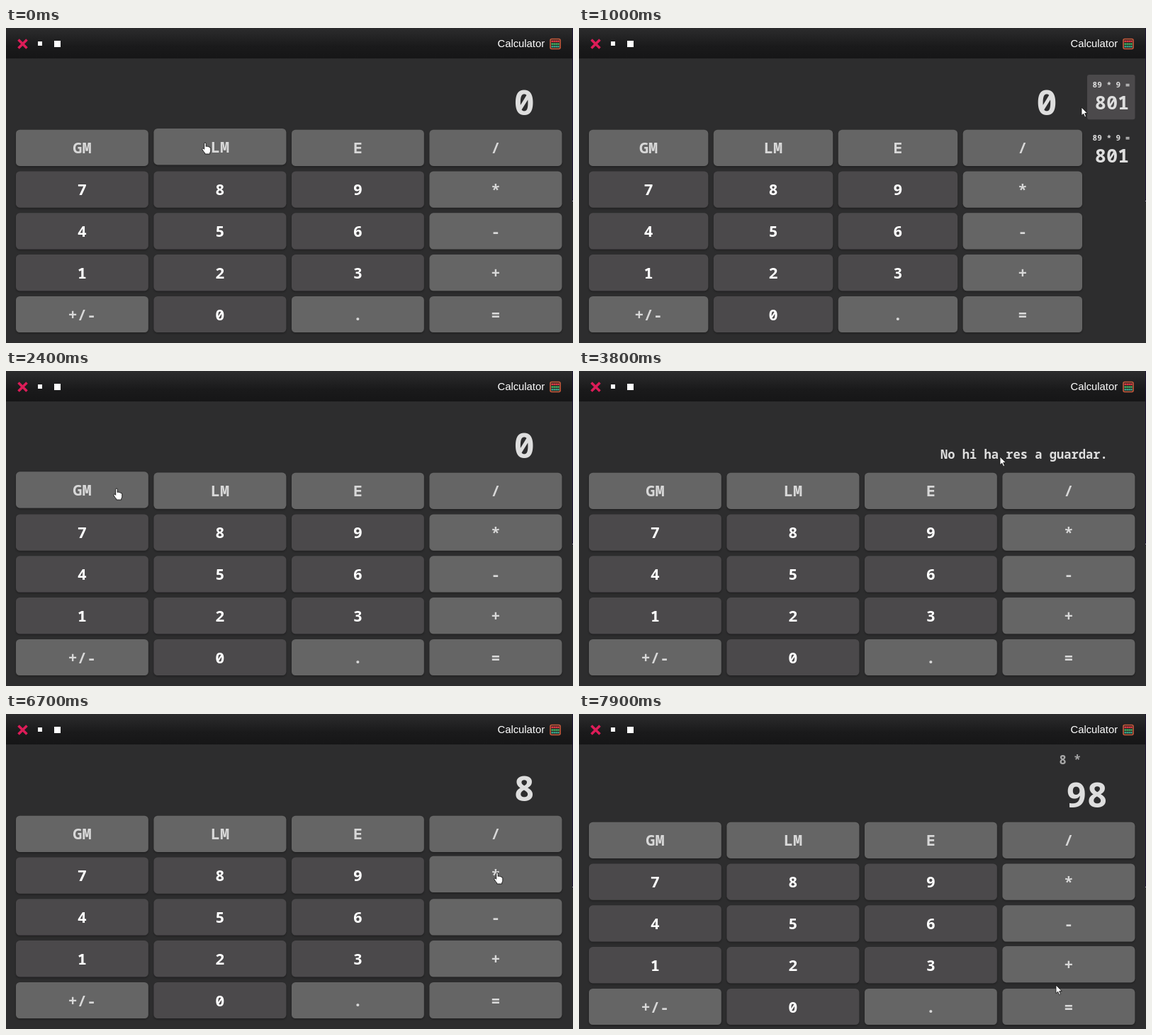
An HTML page for the animation above (8000 ms loop, 800x445 px).

```html
<!DOCTYPE html>
<html lang="ca">
<head>
<meta charset="utf-8">
<title>Calculator</title>
<style>
  html, body { margin: 0; width: 100%; height: 100%; overflow: hidden; background: #2d2d2e; }
  svg { display: block; width: 100vw; height: 100vh; }
  text { font-family: "Noto Sans Mono", "DejaVu Sans Mono", monospace; font-weight: 700; fill: #dedede; white-space: pre; }
  .mid { text-anchor: middle; }
  .end { text-anchor: end; }
  .key text { font-size: 22px; }
  .title { font: 14.8px "Liberation Sans", Arial, sans-serif; fill: #fff; }
</style>
</head>
<body>
<svg id="stage" viewBox="0 0 800 445" preserveAspectRatio="none">
  <defs>
    <linearGradient id="bar" x2="0" y2="1">
      <stop offset="0" stop-color="#2c2c2d"/>
      <stop offset=".6" stop-color="#1a1a1b"/>
      <stop offset="1" stop-color="#161617"/>
    </linearGradient>
    <filter id="shade" x="-5%" y="-15%" width="110%" height="140%">
      <feDropShadow dx="0" dy="1.5" stdDeviation="1.8" flood-color="#000" flood-opacity=".32"/>
    </filter>
  </defs>
  <rect width="800" height="445" fill="#2d2d2e"/>
  <rect width="800" height="43" fill="url(#bar)"/>
  <rect x="799" width="1" height="246" fill="#1d1433"/>
  <rect x="799" y="244" width="1" height="1" fill="#aaa"/>
  <path d="M17.5 16.5l12 12m0-12l-12 12" stroke="#dc1c58" stroke-width="3.6"/>
  <path d="M45 19h6v6h-6zM68 18h9v9h-9z" fill="#fff"/>
  <text class="title" x="693.5" y="27">Calculator</text>
  <g id="abacus">
    <rect x="768" y="15.5" width="14" height="14" rx="2" fill="#2a2422" stroke="#c65a3c" stroke-width="1.6"/>
    <path d="M769.5 18.8h11" stroke="#e83a45" stroke-width="2.4" stroke-dasharray="2.4 .5"/>
    <path d="M769.5 22.6h11" stroke="#45c46a" stroke-width="2.4" stroke-dasharray="2.4 .5"/>
    <path d="M769.5 26.3h11" stroke="#35aa8d" stroke-width="2.4" stroke-dasharray="2.4 .5"/>
  </g>
  <text id="pending" x="677.5" y="71" font-size="17" style="fill:#a8a8a8"></text>
  <text id="display" class="end"></text>
  <g id="keys"></g>
  <g id="memory"></g>
  <path id="arrow" fill="#fff" stroke="#111" stroke-width=".8" stroke-linejoin="round"
        d="M0 0V11.6L2.7 9.2L4.7 13.7L6.6 12.9L4.7 8.5H8.3Z"/>
  <path id="hand" fill="#fff" stroke="#111" stroke-width=".9" stroke-linejoin="round"
        d="M-1.3 1.2Q-1.2 0 0 0T1.2 1.2V5.4Q2.4 4.5 3.5 5.6Q4.8 5 5.7 6.3Q7.8 6 7.8 8V11.2Q7.8 13 6.7 14.2V16H-.3V14.7Q-2 13 -4 9.8Q-4.6 8.2 -3.2 8Q-2.2 8 -1.3 9.3Z"/>
</svg>
<script>
const LOOP = 8000, STEP = 100, FADE = 240;
const LEFT = 14, GAP = 7.7, TOP = 143.7, PITCH = 58.8, KEY_H = 51.2;
const labels = ['GM', 'LM', 'E', '/', '7', '8', '9', '*', '4', '5', '6', '-',
                '1', '2', '3', '+', '+/-', '0', '.', '='];
const $ = id => document.getElementById(id);

// Pointer path: time, x, y
const path = [
  [0, 281, 162], [250, 281, 162], [700, 742, 96], [850, 742, 99], [1000, 709, 112],
  [1550, 276, 165], [1950, 276, 166], [2400, 156, 166], [2900, 134, 168],
  [3300, 520, 120], [3800, 594, 121], [4300, 690, 116], [4950, 325, 231],
  [5200, 313, 233], [5700, 311, 233], [6350, 690, 222], [6700, 693, 224],
  [6800, 693, 224], [7050, 500, 234], [7150, 498, 235], [7350, 306, 234],
  [7450, 306, 235], [7800, 666, 368], [7900, 673, 383]
];

// Screen states: start time, display, pending operation, memory open
const states = [
  [0, '0', '', false],
  [300, '0', '', true],
  [1800, '0', '', false],
  [2800, 'No hi ha res a guardar.', '', false],
  [5600, '8', '', false],
  [6800, '0', '8 *', false],
  [7100, '9', '8 *', false],
  [7400, '98', '8 *', false]
];

function make(tag, parent, attrs, text) {
  const el = document.createElementNS('http://www.w3.org/2000/svg', tag);
  for (const name in attrs) el.setAttribute(name, attrs[name]);
  if (text) el.textContent = text;
  return parent.appendChild(el);
}

function set(el, attrs) {
  for (const name in attrs) el.setAttribute(name, attrs[name]);
}

const keys = labels.map((label, i) => {
  const digit = /\d/.test(label);
  const group = make('g', $('keys'), { class: 'key' });
  const box = make('rect', group, { height: KEY_H, rx: 5.5, fill: digit ? '#4b494b' : '#656565', filter: 'url(#shade)' });
  const text = make('text', group, { class: 'mid', y: 33.8 }, label);
  text.style.fill = digit ? '#fff' : '#d8d8d8';
  return { group, box, text, col: i % 4, row: i >> 2 };
});

const cards = [0, 1].map(i => {
  const group = make('g', $('memory'), { transform: `translate(717 ${66 + i * 75.3})` });
  const box = make('rect', group, { width: 67.5, height: 63.3, rx: 3, fill: '#4b494b' });
  make('text', group, { class: 'mid', x: 34, y: 18, 'font-size': 11 }, '89 * 9 =');
  make('text', group, { class: 'mid', x: 35, y: 49, 'font-size': 27 }, '801');
  return { box, y: 66 + i * 75.3 };
});

function pointer(t) {
  const i = path.findIndex(p => p[0] > t);
  if (i < 0) return path[path.length - 1].slice(1);
  if (!i) return path[0].slice(1);
  const [t0, x0, y0] = path[i - 1], [t1, x1, y1] = path[i];
  const k = (t - t0) / (t1 - t0);
  const e = k * k * (3 - 2 * k);
  return [x0 + (x1 - x0) * e, y0 + (y1 - y0) * e];
}

function layout(t) {
  const [, shown, pending, open] = states.filter(s => s[0] <= t).pop();
  const width = ((open ? 696 : 770.3) - 3 * GAP) / 4;
  return { shown, pending, open, width, top: TOP + (pending ? 9 : 0) };
}

// Returns a key index, 20 or 21 for a memory card, or -1
function hovered(t) {
  t = Math.max(0, t);
  const [x, y] = pointer(t), { open, width, top } = layout(t);
  if (open && x >= 717 && x < 784.5) {
    const c = cards.findIndex(card => y >= card.y && y < card.y + 63.3);
    return c < 0 ? -1 : 20 + c;
  }
  return keys.findIndex(k => {
    const dx = x - LEFT - k.col * (width + GAP), dy = y - top - k.row * PITCH;
    return dx >= 0 && dx < width && dy >= 0 && dy < KEY_H;
  });
}

// Share of the fade window that each item spent under the pointer
function hoverLevels(t) {
  const levels = new Array(22).fill(0), n = 12;
  for (let i = 0; i < n; i++) {
    const h = hovered(t - i * FADE / n);
    if (h >= 0) levels[h] += 1 / n;
  }
  return levels;
}

function draw(t) {
  const { shown, pending, open, width, top } = layout(t);
  const levels = hoverLevels(t), [px, py] = pointer(t);

  keys.forEach((k, i) => {
    const x = LEFT + k.col * (width + GAP), y = top + k.row * PITCH - 1.7 * levels[i];
    set(k.group, { transform: `translate(${x} ${y})` });
    set(k.box, { width });
    set(k.text, { x: width / 2 });
  });
  cards.forEach((c, i) => set(c.box, { opacity: Math.min(1, levels[20 + i] * 1.4) }));
  $('memory').style.display = open ? '' : 'none';

  const message = shown.length > 10;
  $('display').textContent = shown;
  set($('display'), {
    x: open ? 674.7 : 745.8,
    y: message ? 124.3 : top - 20.3,
    'font-size': message ? 17.1 : 49
  });
  $('pending').textContent = pending;

  const onItem = hovered(t) >= 0;
  $('hand').style.display = onItem ? '' : 'none';
  $('arrow').style.display = onItem ? 'none' : '';
  set($(onItem ? 'hand' : 'arrow'), { transform: `translate(${px} ${py})` });
}

const start = performance.now();
function tick() {
  const t = (performance.now() - start) % LOOP;
  draw(Math.floor(t / STEP) * STEP);
  requestAnimationFrame(tick);
}
tick();
</script>
</body>
</html>
```
